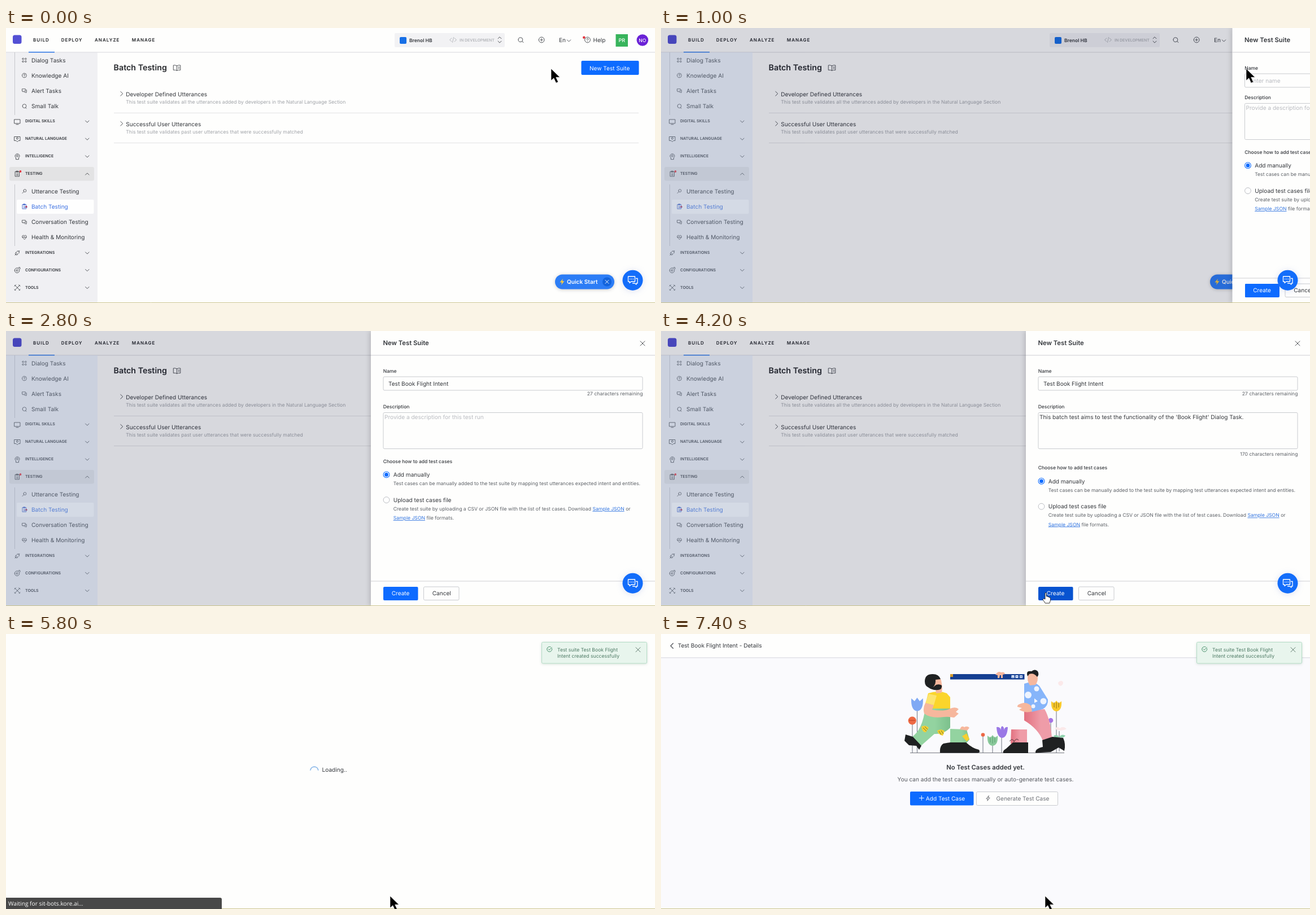
These frames come from a looping animation (1149x487 px, 8000 ms). An HTML page:

```html
<!DOCTYPE html>
<html lang="en">
<head>
<meta charset="utf-8">
<title>Batch testing walkthrough</title>
<style>
html, body { margin: 0; width: 100%; height: 100%; overflow: hidden; background: #fefefd; }
svg { display: block; width: 1149px; height: 487px; }
text { font: 400 10.08px Inter, sans-serif; fill: #34373c; text-rendering: geometricPrecision; white-space: pre; }
.title { font-size: 11.25px; font-weight: 600; }
.heading { font-size: 14.3px; font-weight: 600; fill: #26282c; }
.small { font-size: 8.65px; fill: #5c6066; }
.pale { fill: #a0a3a8; }
.label { font-size: 8.52px; font-weight: 500; }
.section { font-size: 7px; font-weight: 600; }
.nav { font-size: 8px; font-weight: 600; letter-spacing: 1px; fill: #202226; }
.hint { fill: #b9bbc0; }
.white { fill: #fff; }
.link { fill: #2f73e0; text-decoration: underline; }
.end { text-anchor: end; }
.mid { text-anchor: middle; }
.bar { font: 400 10.2px "Open Sans", "Noto Sans", sans-serif; fill: #fff; }
.icon { fill: none; stroke: #4a4d52; stroke-width: .95; stroke-linecap: round; stroke-linejoin: round; }
.field { fill: #fefefd; stroke: #c9cbcf; }
.blue { fill: #0d6bff; }
.rule { stroke: #e2e2e4; }
.panel { filter: drop-shadow(-2px 0 4px rgba(0, 0, 0, .16)); }
.skin { fill: #f6b79d; }
.dark { fill: #1f2122; }
.leaf { fill: url(#leaf); }
.rose { fill: url(#rose); }

[class*="a-"] { animation: 8s step-end infinite; }
.a-move { animation-name: move; }
.a-arrow { animation-name: arrow; }
.a-hand { animation-name: hand; }
.a-beam { animation-name: beam; }
.a-shade { animation-name: shade; }
.a-panel { animation-name: panel; }
.a-new { animation-name: new-hover; }
.a-create { animation-name: create-hover; }
.a-desc { animation-name: desc; }
.a-rest { animation-name: rest; }
.a-left1 { animation-name: left1; }
.a-left2 { animation-name: left2; }
.a-row { animation-name: row; }
.a-load { animation-name: load; }
.a-details { animation-name: details; }
.a-toast { animation-name: toast; }
.a-status { animation-name: status; }
.a-connect { animation-name: connect; }
.a-wait { animation-name: wait; }
.spin { animation: spin 1.2s steps(6) infinite; }

@keyframes move {
  0% { transform: translate(965px, 72px); }
  2.5% { transform: translate(1000px, 72px); }
  5% { transform: translate(1036px, 72px); }
  17.5% { transform: translate(1022px, 74px); }
  20% { transform: translate(1000px, 75px); }
  22.5% { transform: translate(978px, 76px); }
  25% { transform: translate(860px, 86px); }
  27.5% { transform: translate(780px, 93px); }
  37.5% { transform: translate(760px, 165px); }
  45% { transform: translate(708px, 345px); }
  47.5% { transform: translate(696px, 405px); }
  50% { transform: translate(681px, 463px); }
  67.5%, 100% { transform: translate(680px, 464px); }
}
@keyframes arrow {
  0%, 12.5%, 45%, 67.5%, 100% { visibility: visible; }
  5%, 27.5%, 50% { visibility: hidden; }
}
@keyframes hand {
  0%, 12.5%, 67.5%, 100% { visibility: hidden; }
  5%, 50% { visibility: visible; }
}
@keyframes beam {
  0%, 30%, 40%, 100% { visibility: hidden; }
  27.5%, 37.5% { visibility: visible; }
}
@keyframes shade { 0%, 60%, 100% { opacity: 0; } 10% { opacity: .5; } 12.5% { opacity: 1; } }
@keyframes panel {
  0%, 65%, 100% { transform: translateX(530px); }
  12.5% { transform: translateX(365.5px); }
  15% { transform: translateX(24px); }
  17.5% { transform: none; }
  60% { transform: translateX(10.5px); }
  62.5% { transform: translateX(260px); }
}
@keyframes new-hover { 0%, 12.5%, 100% { fill: #0d6bff; } 5% { fill: #0753d0; } }
@keyframes create-hover { 0%, 67.5%, 100% { fill: #0d6bff; } 50% { fill: #0753d0; } }
@keyframes desc { 0% { transform: none; } 27.5%, 100% { transform: translateY(11px); } }
@keyframes rest { 0% { transform: none; } 27.5% { transform: translateY(11px); } 37.5%, 100% { transform: translateY(22.5px); } }
@keyframes left1 { 0% { visibility: hidden; } 27.5%, 100% { visibility: visible; } }
@keyframes left2 { 0% { visibility: hidden; } 37.5%, 100% { visibility: visible; } }
@keyframes row { 0% { visibility: hidden; } 60%, 100% { visibility: visible; } }
@keyframes load { 0%, 80%, 100% { visibility: hidden; } 67.5% { visibility: visible; } }
@keyframes details { 0% { visibility: hidden; } 80%, 100% { visibility: visible; } }
@keyframes toast { 0% { visibility: hidden; } 65%, 100% { visibility: visible; } }
@keyframes status { 0%, 82.5%, 100% { visibility: hidden; } 60% { visibility: visible; } }
@keyframes connect { 0%, 70%, 100% { visibility: hidden; } 60% { visibility: visible; } }
@keyframes wait { 0%, 82.5%, 100% { visibility: hidden; } 70% { visibility: visible; } }
@keyframes spin { to { transform: rotate(360deg); } }
</style>
</head>
<body>
<svg viewBox="0 0 1149 487">
<defs>
  <path id="down" d="M-3.2-1.6L0 1.6 3.2-1.6"/>
  <path id="cross" d="M-4-4L4 4M4-4L-4 4"/>
  <path id="bolt" d="M1.5-5.5L-4 1H-.4L-1.5 5.5 4-1.2H.4Z"/>
  <path id="tulip" d="M-9-8L-4-4 0-9 4-4 9-8Q10 9 0 10Q-10 9-9-8Z"/>
  <linearGradient id="leaf"><stop offset=".6" stop-color="#93d3a0"/><stop offset="1" stop-color="#7cc08c"/></linearGradient>
  <linearGradient id="rose"><stop stop-color="#e2707f"/><stop offset=".6" stop-color="#ef9ca8"/></linearGradient>
</defs>

<!-- page -->
<rect width="1149" height="487" fill="#fefefd"/>
<rect y="43" width="162" height="444" fill="#f0f0f3"/>
<path d="M0 43H1149" stroke="#e3e3e7" stroke-width="1.5"/>
<rect x="12" y="12.5" width="15.5" height="15.5" rx="3.5" fill="#5350d4"/>
<text class="nav" x="48" y="23.8">BUILD</text>
<text class="nav" x="97.8" y="23.8">DEPLOY</text>
<text class="nav" x="157" y="23.8">ANALYZE</text>
<text class="nav" x="222.8" y="23.8">MANAGE</text>
<path d="M40 42.8H86" stroke="#2a76e8" stroke-width="1.6"/>

<rect x="688" y="9" width="195" height="25" rx="2" fill="#f2f2f4"/>
<rect x="697" y="16" width="12" height="12" rx="2" fill="#176fe6"/>
<text class="label" x="714" y="24.6" style="font-weight:600">Brenol HB</text>
<path class="icon" d="M789 18L785.5 21 789 24M794 18L797.5 21 794 24M792.5 16.5L790.5 25.5" style="stroke:#b4b6ba"/>
<text class="section" x="803" y="23.5" style="fill:#b4b6ba">IN DEVELOPMENT</text>
<path class="icon" d="M871 18.8L874 15.8 877 18.8M871 23.2L874 26.2 877 23.2"/>
<path class="icon" d="M914 23.6L916 25.8M907 20.8a3.9 3.9 0 1 0 7.8 0a3.9 3.9 0 1 0-7.8 0"/>
<path class="icon" d="M943.2 21a4.9 4.9 0 1 0 9.8 0a4.9 4.9 0 1 0-9.8 0M945.8 21H950.4M948.1 18.7V23.3"/>
<text x="979" y="24.8">En</text>
<use href="#down" class="icon" x="996.5" y="22.5"/>
<path class="icon" d="M1024.6 21a4.9 4.9 0 1 0 9.8 0a4.9 4.9 0 1 0-9.8 0M1028 20q0-1.6 1.6-1.6t1.5 1.5q0 .8-1.5 1.6M1029.5 23.6v.1"/>
<circle cx="1023.3" cy="16.8" r="2.3" fill="#e2363f"/>
<text x="1039.5" y="24.8">Help</text>
<rect x="1079.5" y="11" width="21.5" height="22" fill="#38b45c"/>
<text class="white mid" x="1090.3" y="24.8" style="font-size:9px;font-weight:500">PR</text>
<circle cx="1126.8" cy="21.5" r="10.3" fill="#6a22d6"/>
<text class="white mid" x="1126.8" y="24.6" style="font-size:8.5px;font-weight:500">NO</text>

<path d="M15.5 43V154M15.5 277V386" stroke="#c6c7cb"/>
<rect x="6" y="246" width="150" height="24.5" rx="3" fill="#e3e3e4"/>
<rect x="19" y="304" width="136.5" height="25" rx="2" fill="#fefefe"/>
<g id="menu"></g>

<text class="heading" x="190.5" y="74.8">Batch Testing</text>
<path class="icon" d="M302.5 67V75.5M302.5 67Q299 65 296.3 66V74.5Q300 73.8 302.5 75.5Q305 73.8 308.8 74.5V66Q306 65 302.5 67M305 69.2H307M305 71.4H307"/>
<rect class="a-new" x="1018.5" y="58" width="102" height="25" rx="2" fill="#0d6bff"/>
<text class="white" x="1033" y="74.5">New Test Suite</text>

<g>
  <path class="icon" d="M202.8 112.5L206.8 116.3 202.8 120.1"/>
  <text x="212.3" y="120.6">Developer Defined Utterances</text>
  <text class="small pale" x="212.3" y="133.9">This test suite validates all the utterances added by developers in the Natural Language Section</text>
  <path class="rule" d="M191 150.5H1120"/>
</g>
<g>
  <path class="icon" d="M202.8 165.5L206.8 169.3 202.8 173.1"/>
  <text x="212.3" y="173.8">Successful User Utterances</text>
  <text class="small pale" x="212.3" y="187">This test suite validates past user utterances that were successfully matched</text>
  <path class="rule" d="M191 203.5H1120"/>
</g>
<g class="a-row">
  <path class="icon" d="M202.8 218.3L206.8 222.1 202.8 225.9"/>
  <text x="212.3" y="226.6">Test Book Flight Intent</text>
  <text class="small pale" x="212.3" y="239.8">This batch test aims to test the functionality of the 'Book Flight' Dialog Task.</text>
  <path class="rule" d="M191 256.2H1120"/>
</g>

<g>
  <rect x="972" y="436.5" width="105" height="26" rx="13" fill="#2c7df6" style="filter:drop-shadow(0 1px 3px rgba(0,0,0,.2))"/>
  <use href="#bolt" x="984.5" y="449.5" fill="#ffcb3d"/>
  <text class="white" x="993" y="453" style="font-weight:600">Quick Start</text>
  <circle cx="1064" cy="449.5" r="8" fill="#1263dc"/>
  <path class="icon" d="M1061 446.5L1067 452.5M1067 446.5L1061 452.5" style="stroke:#fff"/>
</g>

<g class="a-shade">
  <rect width="1149" height="487" fill="rgb(15,20,60)" fill-opacity=".16"/>
  <rect y="43" width="162" height="444" fill="rgb(200,225,255)" fill-opacity=".22"/>
</g>

<!-- side panel -->
<g class="a-panel">
  <rect class="panel" x="646" width="503" height="487" fill="#fefefd"/>
  <path d="M646 43H1149M646 443H1149" stroke="#dedee2" stroke-width="1.5"/>
  <text class="title" x="667.5" y="24.6">New Test Suite</text>
  <use href="#cross" class="icon" x="1127" y="22"/>
  <text class="label" x="667.7" y="74">Name</text>
  <rect class="field" x="668" y="81" width="459" height="24" rx="2"/>
  <text id="name" x="677" y="96.7"></text>
  <text id="name-left" class="small end a-left1" x="1127.5" y="114"></text>
  <g class="a-desc">
    <text class="label" x="667.7" y="126">Description</text>
    <rect class="field" x="668" y="133.5" width="459" height="64" rx="2"/>
    <text id="desc" x="670" y="145.2"></text>
    <text id="desc-left" class="small end a-left2" x="1127.5" y="210.4"></text>
  </g>
  <g class="a-rest">
    <text class="label" x="667.7" y="222.6">Choose how to add test cases</text>
    <circle cx="673.5" cy="243.4" r="5.4" fill="#fff" stroke="#0d6bff" stroke-width="1.1"/>
    <circle cx="673.5" cy="243.4" r="3.4" class="blue"/>
    <text x="685.7" y="247">Add manually</text>
    <text class="small" x="685.7" y="262">Test cases can be manually added to the test suite by mapping test utterances expected intent and entities.</text>
    <circle cx="673.5" cy="288.2" r="5.4" fill="#fff" stroke="#b9bbc0"/>
    <text x="685.7" y="291.7">Upload test cases file</text>
    <text class="small" x="685.7" y="306.9">Create test suite by uploading a CSV or JSON file with the list of test cases. Download <tspan class="link">Sample JSON</tspan> or</text>
    <text class="small" x="685.7" y="323"><tspan class="link">Sample JSON</tspan> file formats.</text>
  </g>
  <rect class="a-create" x="668" y="453" width="61.5" height="24" rx="2" fill="#0d6bff"/>
  <text class="white" x="682.7" y="468.4">Create</text>
  <rect class="field" x="739.5" y="453" width="62.5" height="23.5" rx="2"/>
  <text x="754.7" y="468.4">Cancel</text>
</g>

<g>
  <circle cx="1109.5" cy="446.7" r="18" fill="#136dfa" style="filter:drop-shadow(0 1px 6px rgba(60,90,200,.18))"/>
  <path class="icon" d="M1101.5 440H1113.5V449H1107L1104 451.5V449H1101.5ZM1115.5 443.5H1118V452H1116V454.2L1113 452H1109.5" style="stroke:#fff;stroke-width:1.3"/>
  <path class="icon" d="M1104.6 444.6h.1M1107.5 444.6h.1M1110.4 444.6h.1" style="stroke:#fff;stroke-width:1.6"/>
</g>
<path d="M0 486.5H1149" stroke="#cbc48d"/>

<!-- loading -->
<g class="a-load">
  <rect width="1149" height="486" fill="#fefefd"/>
  <g transform="translate(545.8 240)"><g class="spin"><path d="M-6.9 1A7 7 0 0 1 6.9 1" transform="rotate(60)" class="icon" style="stroke:#5b9be0;stroke-width:1.3"/></g></g>
  <text x="559.6" y="243.8">Loading..</text>
</g>

<!-- details -->
<g class="a-details">
  <rect width="1149" height="486" fill="#fafafd"/>
  <rect width="1149" height="41.5" fill="#fefefd"/>
  <path d="M0 42H1149" stroke="#e2e2e8" stroke-width="1.6"/>
  <path class="icon" d="M21.5 16.5L17 21 21.5 25.5" style="stroke-width:1.2"/>
  <text x="29.7" y="23.8">Test Book Flight Intent - Details</text>

  <g id="art">
    <path d="M441 210.5H714" stroke="#77797f" stroke-width="1.2"/>
    <path d="M453.5 134V210M445 160V210M700 134V210M690 156V190M570 180V210M587 196V210M603 182V210M705 172V208" stroke="#6f7480" fill="none"/>
    <use href="#tulip" transform="translate(453.5 124) scale(1.15 1.25)" fill="#7fa9f4"/>
    <circle cx="444.8" cy="153.5" r="7.2" fill="#ee6a45"/>
    <path d="M439 153H450" stroke="#b83e25"/>
    <use href="#tulip" x="700" y="127" fill="#f9c92b"/>
    <path d="M696 121V130M700 121V132M704 121V130" stroke="#8f7116"/>
    <circle cx="690" cy="153" r="4.3" fill="#a774e4"/>
    <path d="M697 168q4-6 9-1q6-5 12 1q-10 6-21 0ZM703 86q4-5 8-2q3 4-3 8q-5-1-5-6Z" fill="#fbe9ea"/>
    <path d="M705 182q-4-5-10-2q3 6 10 2q5-6 11-2q-4 6-11 2Z" fill="#8fd3ae"/>
    <circle cx="570" cy="178.5" r="3.3" fill="#ec6846"/>
    <use href="#tulip" x="587" y="188" fill="#8ac99b"/>
    <path d="M583 182V192M587 182V194M591 182V192" stroke="#5a9d70"/>
    <path d="M594 165q6-1 8 5q-1-5 2-7q4 2 3 7q2-6 7-5q-1 18-10 19q-9-1-10-19Z" fill="#9a78e6"/>

    <!-- left figure -->
    <path class="leaf" d="M468 130H512V166Q500 178 484 177L458 200 443 183Q463 171 468 130Z"/>
    <path class="dark" d="M433 178L446 182 461 198 457 205 452 198 439 197 431 189Z"/>
    <path d="M461 164q7-4 13 2l-5 8q-7 0-8-10ZM489 171q8-4 13 1l-3 8q-8-1-10-9Z" fill="#f6cf31"/>
    <path d="M464 166L470 172M467 164L472 169M492 172L496 178M496 171L500 177" stroke="#6b7b2e"/>
    <path d="M473 105Q492 99 506 105L512 112V132H471L469 121Z" fill="#fbd52b"/>
    <path d="M474 106L488 109 483 126 468 122Z" fill="#fce46f"/>
    <path class="skin" d="M468 122L483 126 480 134Q500 138 512 132Q522 128 527 133L522 138 527 141 519 148Q508 146 500 147Q478 150 466 141Q463 132 468 122Z"/>
    <path class="skin" d="M486 96L498 95 497 104 487 105Z"/>
    <path class="skin" d="M482 80Q492 73 496 82L498 94Q491 100 483 95Z"/>
    <path class="dark" d="M467 84Q467 71 481 71Q492 71 495 80L486 81Q487 88 482 94L487 90Q493 88 497 91Q498 98 491 99Q480 100 474 95Q467 92 467 84Z"/>
    <path class="leaf" d="M512 168L541 169 546 187 541 193H512Z"/>
    <path d="M533 181l8-5 5 10-5 4Z" fill="#f6cf31"/>
    <path class="skin" d="M529 169q3-8 8-4q5-3 9 1l-4 5Z"/>
    <path class="dark" d="M512 192H540Q552 203 563 205Q566 210 561 210.5H494Q493 198 500 194Z"/>

    <!-- right figure -->
    <path class="rose" d="M643 137L679 133Q689 150 692 183L676 189Q668 168 643 153Z"/>
    <path class="rose" d="M620 169H648V194H619Z"/>
    <path class="dark" d="M623 192H650V211H606Q604 207 611 203Z"/>
    <path class="dark" d="M675 188L693 182 712 184Q717 195 714 207L704 201 690 209 663 210.5Q662 203 676 200Z"/>
    <path d="M643 88Q660 82 670 92L685 116Q686 127 676 133L656 138 651 127 667 119 661 114V134L643 138Z" fill="#86b5fa"/>
    <g fill="#eef4ff"><circle cx="650" cy="108" r="6"/><circle cx="665" cy="97" r="4.5"/><circle cx="677" cy="119" r="5.5"/><circle cx="659" cy="128" r="3.5"/></g>
    <path class="skin" d="M655 127L657 137Q646 141 634 134L639 131 631 129Q630 125 638 123Q647 120 655 127Z"/>
    <path class="skin" d="M650 72Q657 67 666 72Q669 82 663 90L653 91Q647 82 650 72Z"/>
    <path class="dark" d="M649 75Q645 64 656 66Q662 61 667 66Q670 72 666 76Q660 68 652 71Z"/>
    <path d="M617 190q6-7 8 1q4-8 8-3" fill="none" stroke="#5b3840"/>

    <rect x="512" y="80.5" width="131.5" height="4" fill="#fafafd"/>
    <rect x="512" y="71" width="131.5" height="9.5" fill="#153f92"/>
    <rect x="512" y="71" width="5" height="5" fill="#d39a2d"/>
    <path d="M620.5 73h5v5h-5ZM627.5 73h5v5h-5ZM635 73h5v5h-5Z" fill="#dce7fb"/>
    <path d="M622 76.5h2M629 75.5h2M636 74l3 3M639 74l-3 3" stroke="#153f92" stroke-width=".8"/>
    <path class="skin" d="M592 72q5-7 10-4q6-2 7 3l-4 1v6h-3v-5h-2l-1 5h-3v-5Z"/>
  </g>

  <text class="title mid" x="574.5" y="240.4">No Test Cases added yet.</text>
  <text class="mid" x="574.5" y="261.2" style="fill:#55585e">You can add the test cases manually or auto-generate test cases.</text>
  <rect class="blue" x="441" y="279" width="112.5" height="24.5" rx="2"/>
  <path class="icon" d="M457.3 290.5H465.3M461.3 286.5V294.5" style="stroke:#fff"/>
  <text class="white" x="468.8" y="294.7">Add Test Case</text>
  <rect class="field" x="558.5" y="279.5" width="144" height="24" rx="2"/>
  <use href="#bolt" class="icon" transform="translate(579 291) scale(.8)"/>
  <text x="593.5" y="294.7" style="fill:#6d7076">Generate Test Case</text>
  <path d="M0 486.5H1149" stroke="#cbc48d"/>
</g>

<g class="a-toast">
  <rect x="948.5" y="14.5" width="186" height="37.5" rx="2" fill="#e8f5ed" stroke="#b4dcc6" style="filter:drop-shadow(0 1px 2px rgba(0,60,30,.15))"/>
  <path class="icon" d="M966.6 25.8A4.5 4.5 0 1 1 964.3 22.9M960.2 26.5L962 28.3 966.3 23.8" style="stroke:#3f8a64"/>
  <text class="small" x="976" y="30.7" style="fill:#4c7963">Test suite Test Book Flight</text>
  <text class="small" x="976" y="42.3" style="fill:#4c7963">Intent created successfully</text>
  <use href="#cross" class="icon" x="1119" y="27.8" style="stroke:#5b7568"/>
</g>

<path class="a-status" d="M0 467H379Q382 467 382 470V487H0Z" fill="#484848"/>
<text class="bar a-connect" x="4" y="480.8">Establishing secure connection...</text>
<text class="bar a-wait" x="4" y="480.8">Waiting for sit-bots.kore.ai...</text>

<g class="a-move">
  <path class="a-arrow" d="M0 0V21L4.8 16.8 8.8 25.3 12.6 23.6 8.7 15.3H15.6Z" fill="#000" stroke="#fff" stroke-width=".6"/>
  <path class="a-hand" d="M-1 1Q0-.5 1.3 1V7Q3.5 6 4 8Q6 7 6.5 9Q8.5 8.5 8.5 11V14L6.8 19H-.8L-5 12.5Q-4.5 10-1 12Z" fill="#fff" stroke="#222" stroke-width=".9"/>
  <path class="a-beam" d="M-2.5-7Q0-7 0-5Q0-7 2.5-7M0-5V5M-2.5 7Q0 7 0 5Q0 7 2.5 7" fill="none" stroke="#222"/>
</g>
</svg>

<script>
const $ = id => document.getElementById(id);
const ring = (x, y, r) => `M${x - r} ${y}a${r} ${r} 0 1 0 ${2 * r} 0a${r} ${r} 0 1 0 ${-2 * r} 0`;

const chats = 'M-4-3.5H2V1H-1L-2.5 2.5V1H-4ZM3.5-1.5H4.3V3H3.5V4.3L2 3H0';
const clip = 'M-3.5-4H3.5V4.5H-3.5ZM-1.5-5H1.5V-3H-1.5ZM-1.5 0H1.5M-1.5 2.3H1.5';
const items = [
  [57, 'Dialog Tasks', ring(-2.6, -2.6, 1.5) + ring(2.6, -2.6, 1.5) + ring(-2.6, 2.6, 1.5) + ring(2.6, 2.6, 1.5)],
  [84, 'Knowledge AI', ring(0, 0, 4.3) + 'M-1.3-1Q-1.3-2.3 0-2.3T1.3-1Q1.3 0 0 .7M0 2.3v.1'],
  [111, 'Alert Tasks', chats],
  [138.5, 'Small Talk', ring(0, -.3, 3.8) + 'M2 2.8L4 4.3'],
  [289, 'Utterance Testing', ring(1, -1, 2.7) + 'M-1 1L-4 4'],
  [316.2, 'Batch Testing', clip + 'M1 1H5M3.5-.8L5.3 1 3.5 2.8'],
  [343.5, 'Conversation Testing', chats],
  [370.7, 'Health & Monitoring', 'M0 4L-4 0Q-5-4-2-4Q-.5-4 0-2.5Q.5-4 2-4Q5-4 4 0ZM-4 0H-1.5L-.5-1.5 .8 1.2 1.5 0H4'],
];
const sections = [
  [164.7, 'DIGITAL SKILLS', 'M-5-3.5H5V3.5H-5ZM-2 5.3H2'],
  [195.7, 'NATURAL LANGUAGE', 'M-5-4H5V3H2L0 5-2 3H-5Z' + ring(0, -1, 1.6)],
  [226.5, 'INTELLIGENCE', 'M-2.5 5V2.5Q-5 0-3.5-2.5Q0-6.5 3.7-2.5Q5 0 2.5 2.5V5Z' + ring(0, -.8, 1.6)],
  [257.5, 'TESTING', clip],
  [397.5, 'INTEGRATIONS', 'M-4 4L-2 2M4-4L2-2M-2.5-1L1 2.5Q-1.5 4.5-3 3T-2.5-1ZM-1-2.5Q1.5-4.5 3-3T2.5 1'],
  [428, 'CONFIGURATIONS', ring(-.5, .5, 4.3) + ring(-.5, .5, 1.6) + 'M2-4.5L4.5-5 5-2'],
  [459, 'TOOLS', 'M-4.5 4.5L4.5-4.5M-4.5-4.5L4.5 4.5M2.5-5L5-2.5M-5-2.5L-2.5-5M-5 3L-3 5M3 5L5 3'],
];

$('menu').innerHTML = items.map(([y, label, icon]) => {
  const on = label === 'Batch Testing';
  return `<path class="icon" transform="translate(32.5 ${y}) scale(.9)" d="${icon}"${on ? ' style="stroke:#3a5fc8"' : ''}/>
    <text x="45" y="${y + 3.6}"${on ? ' style="fill:#3b70e2"' : ''}>${label.replace('&', '&amp;')}</text>`;
}).join('') + sections.map(([y, label, icon]) => `
  <path class="icon" transform="translate(20 ${y + .8})" d="${icon}"/>
  <text class="section" x="34" y="${y + 2.5}">${label}</text>
  <use href="#down" class="icon" transform="translate(143.8 ${y + 1}) scale(1 ${label === 'TESTING' ? -1 : 1})"/>`
).join('') + '<circle cx="25.5" cy="254" r="1.9" fill="#e2363f"/><circle cx="36" cy="316.5" r="1.5" fill="#b8324f"/>';

const fields = [
  { id: 'name', value: 'Test Book Flight Intent', hint: 'Enter name', max: 50, from: 2200, to: 2800 },
  { id: 'desc', value: "This batch test aims to test the functionality of the 'Book Flight' Dialog Task.",
    hint: 'Provide a description for this test run', max: 250, from: 3000, to: 3600 },
];

let start;
function draw(now) {
  start ??= now;
  const t = Math.floor((now - start) % 8000 / 200) * 200;
  for (const { id, value, hint, max, from, to } of fields) {
    const part = Math.min(1, Math.max(0, (t - from) / (to - from)));
    const count = Math.round(value.length * part);
    const text = t < 4800 ? value.slice(0, count) : '';
    $(id).textContent = text || hint;
    $(id).classList.toggle('hint', !text);
    $(id + '-left').textContent = `${max - count} characters remaining`;
  }
  requestAnimationFrame(draw);
}
requestAnimationFrame(draw);
</script>
</body>
</html>
```
